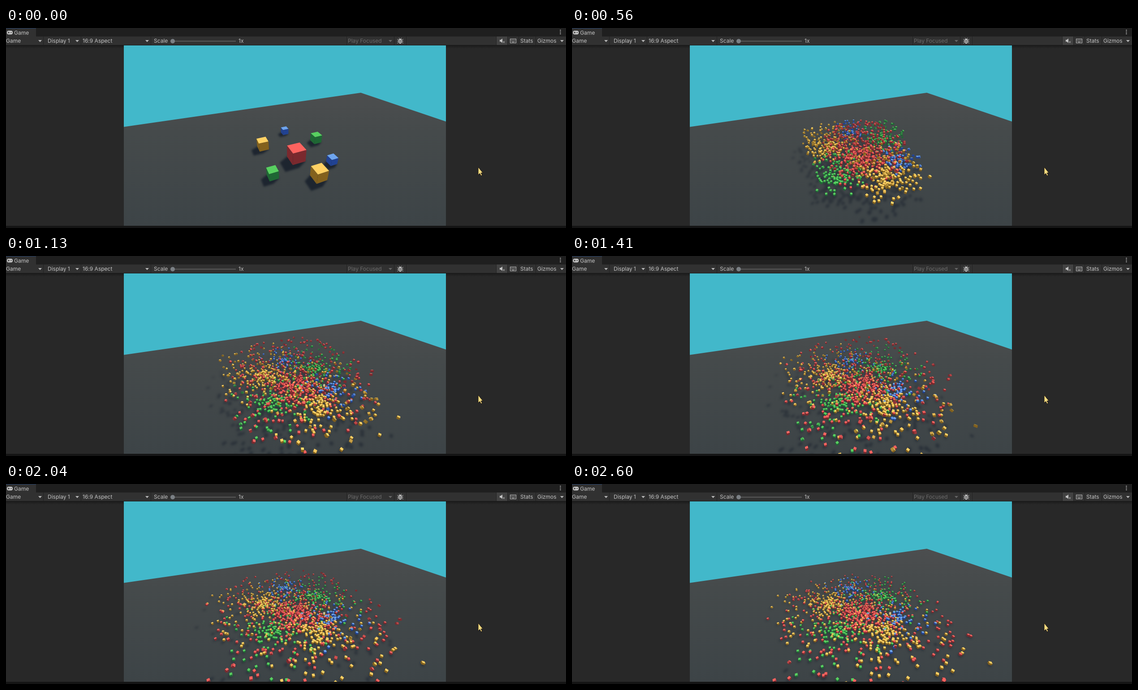
Animation of 1250 by 448 pixels, one loop 2670 ms. Source, as an HTML page with a canvas:

```html
<!DOCTYPE html>
<html lang="en">
<head>
<meta charset="utf-8">
<title>Game view</title>
<style>
  html, body { margin: 0; width: 100%; height: 100%; overflow: hidden; background: #282828; }
  svg, canvas { position: absolute; display: block; }
  svg { left: 0; top: 0; }
  canvas { left: 263px; top: 39px; }
  text { font: 12px Inter, Roboto, sans-serif; font-feature-settings: "calt" 0; fill: #c4c4c4; }
</style>
</head>
<body>
<canvas id="view" width="719" height="404"></canvas>
<svg width="1250" height="448" viewBox="0 0 1250 448">
  <defs>
    <linearGradient id="fade" x2="0" y2="1">
      <stop stop-color="#1b1b1b"/><stop offset="1" stop-color="#1b1b1b" stop-opacity="0"/>
    </linearGradient>
  </defs>
  <path fill="url(#fade)" d="M0 39h263v7H0zM982 39h268v7H982z"/>
  <path fill="#1f1f1f" d="M0 0h1250v19H0z"/>
  <path fill="#313131" d="M0 0h67v19H0zM0 19h1250v19H0z"/>
  <path fill="#1f3c68" d="M0 0h67v1H0z"/>
  <path fill="#1a1a1a" d="M0 38h1250v1H0z"/>
  <path fill="#151515" d="M0 443h1250v5H0z"/>
  <path fill="#424242" d="M1095 19h24v19h-24z"/>
  <path stroke="#222" d="M83.5 19v19M167.5 19v19M323.5 19v19M760.5 19v19M866.5 19v19M893.5 19v19M1094.5 19v19M1119.5 19v19M1144.5 19v19M1182.5 19v19"/>

  <text x="18" y="15">Game</text>
  <text x="0" y="33">Game</text>
  <text x="93" y="33">Display 1</text>
  <text x="171" y="33">16:9 Aspect</text>
  <text x="330" y="33">Scale</text>
  <text x="519" y="33">1x</text>
  <text x="763" y="33" style="fill:#6c6c6c">Play Focused</text>
  <text x="1148" y="33">Stats</text>
  <text x="1186" y="33">Gizmos</text>

  <path fill="#b8b8b8" d="M72 27h8l-4 4.5zM155 27h8l-4 4.5zM311 27h8l-4 4.5zM1237 27h8l-4 4.5z"/>
  <path fill="#666" d="M854 27h8l-4 4.5z"/>
  <path stroke="#5c5c5c" stroke-width="2" d="M372 29.5h141"/>
  <circle cx="372" cy="29.5" r="5" fill="#7b8085"/>
  <path fill="#c4c4c4" d="M1236.5 4h2v2h-2zM1236.5 8h2v2h-2zM1236.5 12h2v2h-2z"/>

  <!-- gamepad -->
  <rect x="2" y="6" width="13" height="8.5" rx="4" fill="#c4c4c4"/>
  <path stroke="#313131" stroke-width="1.3" d="M4 10.2h4M6 8.2v4M10 10.2h3"/>
  <!-- bug -->
  <g stroke="#b8b8b8" fill="none">
    <path d="M873 25l4 2M887 25l-4 2M873 29.5h4M887 29.5h-4M873 34l4-2M887 34l-4-2M877 22l2 3M883 22l-2 3"/>
    <ellipse cx="880" cy="29.5" rx="3.8" ry="5.2" fill="#b8b8b8"/>
    <path stroke="#313131" d="M877 28.5h6M877 31.5h6"/>
  </g>
  <!-- muted speaker -->
  <path fill="#c4c4c4" d="M1102 26.5h2.5l3.5-3v10l-3.5-3h-2.5z"/>
  <path stroke="#c4c4c4" d="M1109.5 29.5l3.5 4M1113 29.5l-3.5 4"/>
  <!-- keyboard -->
  <rect x="1125.5" y="24.5" width="13" height="9" fill="none" stroke="#c4c4c4"/>
  <path stroke="#c4c4c4" stroke-dasharray="2 1" d="M1127 27h10M1127 29.5h10"/>
  <path stroke="#c4c4c4" d="M1129 31.5h6"/>
  <!-- pointer -->
  <path fill="#fbdc80" stroke="#1c1810" d="M1054 311.5v17.5l3.7-3.3 2.6 5.3 2.5-1.2-2.5-5.2h4.2z"/>
</svg>
<script>
const LOOP = 2670, START = 140;
const ctx = document.getElementById('view').getContext('2d');

// Camera above the origin: pitch, yaw of the world axes, focal length in pixels
const CX = 622.5, CY = 241, F = 350, H = 7.33;
const PITCH = 31.2 * Math.PI / 180, YAW = 22.8 * Math.PI / 180;
const cp = Math.cos(PITCH), sp = Math.sin(PITCH), cw = Math.cos(YAW), sw = Math.sin(YAW);
const LIGHT = [0.557, 0.766, 0.322];
const DRAG = 0.7, GRAVITY = 2.6, FALL = GRAVITY / DRAG, BLAST = 13, LIFT = 0.8;

const RED = [[253, 99, 95], [122, 41, 46]];
const YELLOW = [[255, 209, 100], [131, 97, 29]];
const GREEN = [[88, 208, 96], [31, 103, 52]];
const BLUE = [[110, 165, 238], [33, 66, 146]];

let seed = 7;
function rnd() {
  seed = (seed + 0x6D2B79F5) | 0;
  let a = Math.imul(seed ^ (seed >>> 15), 1 | seed);
  a = (a + Math.imul(a ^ (a >>> 7), 61 | a)) ^ a;
  return ((a ^ (a >>> 14)) >>> 0) / 4294967296;
}
const spread = w => (rnd() * 2 - 1) * w;

const depthOf = ([x, y, z]) => (x * sw + z * cw) * cp - (y - H) * sp;

function project(p) {
  const [x, y, z] = p, k = F / depthOf(p);
  return [CX + k * (x * cw - z * sw), CY - k * ((x * sw + z * cw) * sp + (y - H) * cp)];
}

// World point at height y seen at screen position (px, py)
function unproject(px, py, y) {
  const u = px - CX, v = py - CY;
  const depth = (H - y) * F / (v * cp + F * sp);
  const r = u * depth / F, d = depth * cp - v * depth / F * sp;
  return [r * cw + d * sw, y, d * cw - r * sw];
}

function axes(yaw, tilt) {
  const c = Math.cos(yaw), s = Math.sin(yaw), ct = Math.cos(tilt), st = Math.sin(tilt);
  return [[c, 0, s], [-s * st, ct, c * st], [-s * ct, -st, c * ct]];
}

const block = (px, py, size, n, col) =>
  ({ pos: unproject(px, py, size / 2), half: size / 2, n, col, ax: axes(0, 0) });

const blocks = [
  block(648, 281, 1, 8, RED),
  block(573, 260, 0.75, 6, YELLOW),
  block(699, 325, 0.77, 6, YELLOW),
  block(595, 325, 0.61, 5, GREEN),
  block(692, 246, 0.68, 5, GREEN),
  block(728, 295, 0.54, 4, BLUE),
  block(622, 230, 0.53, 4, BLUE)
];

const ease = t => 1 - Math.exp(-DRAG * t);
const height = (p, t) => p.pos[1] + (p.vel[1] + FALL) / DRAG * ease(t) - FALL * t;

function makePiece(b, i, j, k) {
  const half = b.half / b.n;
  const off = [i, j, k].map(q => (2 * q + 1) * half - b.half);
  // Partly round the cubic cloud; a centre piece has no direction
  const round = (Math.max(...off.map(Math.abs)) / Math.hypot(...off)) ** 0.7 || 0;
  const gain = BLAST * round * (0.84 + 0.2 * rnd());
  const p = {
    half, col: b.col,
    pos: off.map((o, a) => b.pos[a] + o),
    vel: off.map((o, a) => a === 1 ? o * gain * LIFT + spread(0.3) : o * gain + spread(0.6)),
    slide: 0.03 + 0.26 * rnd() ** 2,
    spin: spread(2.5),
    land: 0
  };
  while (height(p, p.land + 0.01) > half) p.land += 0.01;
  p.turn = Math.round(spread(3) * p.land) * Math.PI / 2;
  return p;
}

const pieces = [];
for (const b of blocks)
  for (let i = 0; i < b.n; i++)
    for (let j = 0; j < b.n; j++)
      for (let k = 0; k < b.n; k++) pieces.push(makePiece(b, i, j, k));

// Ballistic flight with drag, then a short slide on the floor
function pose(p, t) {
  const air = Math.min(t, p.land), rest = t - air;
  const go = ease(air) / DRAG + Math.exp(-DRAG * air) * p.slide * (1 - Math.exp(-rest / p.slide));
  const tilt = p.land ? p.turn * air / p.land : 0;
  return {
    half: p.half, col: p.col,
    pos: [p.pos[0] + p.vel[0] * go, rest > 0 ? p.half : Math.max(p.half, height(p, t)), p.pos[2] + p.vel[2] * go],
    ax: axes(p.spin * (1 - Math.exp(-2 * t)), tilt)
  };
}

const dot = (a, b) => a[0] * b[0] + a[1] * b[1] + a[2] * b[2];
const RING = [[1, 1], [-1, 1], [-1, -1], [1, -1]];

function faces(s) {
  const list = [];
  for (let i = 0; i < 3; i++) {
    const a = s.ax[i], b = s.ax[(i + 1) % 3], c = s.ax[(i + 2) % 3];
    for (const g of [1, -1]) {
      list.push({
        n: a.map(v => v * g),
        pts: RING.map(([u, v]) => s.pos.map((o, q) => o + s.half * (g * a[q] + g * u * b[q] + v * c[q])))
      });
    }
  }
  return list;
}

function trace(pts) {
  pts.forEach((p, i) => ctx[i ? 'lineTo' : 'moveTo'](...project(p)));
  ctx.closePath();
}

const onFloor = ([x, y, z]) =>
  [x - y * LIGHT[0] / LIGHT[1], 0, z - y * LIGHT[2] / LIGHT[1]];

function drawFloor() {
  ctx.fillStyle = '#42b8ca';
  ctx.fillRect(263, 39, 719, 404);
  const g = ctx.createLinearGradient(0, 145, 0, 443);
  g.addColorStop(0, '#4c4e4f');
  g.addColorStop(0.3, '#454a4b');
  g.addColorStop(1, '#3d4447');
  ctx.fillStyle = g;
  ctx.beginPath();
  ctx.moveTo(263, 221.5);
  ctx.lineTo(792, 145);
  ctx.lineTo(982, 209.5);
  ctx.lineTo(982, 443);
  ctx.lineTo(263, 443);
  ctx.fill();
}

function draw(t) {
  const whole = t < 0;
  const solids = whole ? blocks.slice() : pieces.map(p => pose(p, t));
  solids.sort((a, b) => depthOf(b.pos) - depthOf(a.pos));
  const sides = solids.map(faces);

  ctx.setTransform(1, 0, 0, 1, -263, -39);
  drawFloor();

  ctx.beginPath();
  for (const list of sides)
    for (const f of list) if (dot(f.n, LIGHT) > 0) trace(f.pts.map(onFloor));
  ctx.filter = whole ? 'blur(2px)' : 'blur(2.5px)';
  ctx.fillStyle = `rgba(18,26,39,${whole ? 0.75 : 0.42})`;
  ctx.fill();
  ctx.filter = 'none';

  solids.forEach((s, i) => {
    const [hi, lo] = s.col;
    for (const f of sides[i]) {
      const p = f.pts[0];
      if (dot(f.n, [p[0], p[1] - H, p[2]]) >= 0) continue;
      const lit = Math.min(1.1, Math.max(0, dot(f.n, LIGHT)) / LIGHT[1]);
      ctx.fillStyle = `rgb(${lo.map((v, q) => Math.round(v + (hi[q] - v) * lit))})`;
      ctx.beginPath();
      trace(f.pts);
      ctx.fill();
    }
  });
}

// The picture advances every 70 ms, with one step of 80 ms before 990
function step(ms) {
  if (ms < START) return -1;
  const base = ms < 990 ? START : 990;
  const k = Math.floor((ms - base) / 70);
  return base + 70 * (base === START ? Math.min(k, 11) : k);
}

let shown = null;
const begin = performance.now();
function tick() {
  const at = step((performance.now() - begin) % LOOP);
  if (at !== shown) {
    shown = at;
    draw(at < 0 ? -1 : (at - START) / 1000 + 0.03);
  }
  requestAnimationFrame(tick);
}
tick();
</script>
</body>
</html>
```
